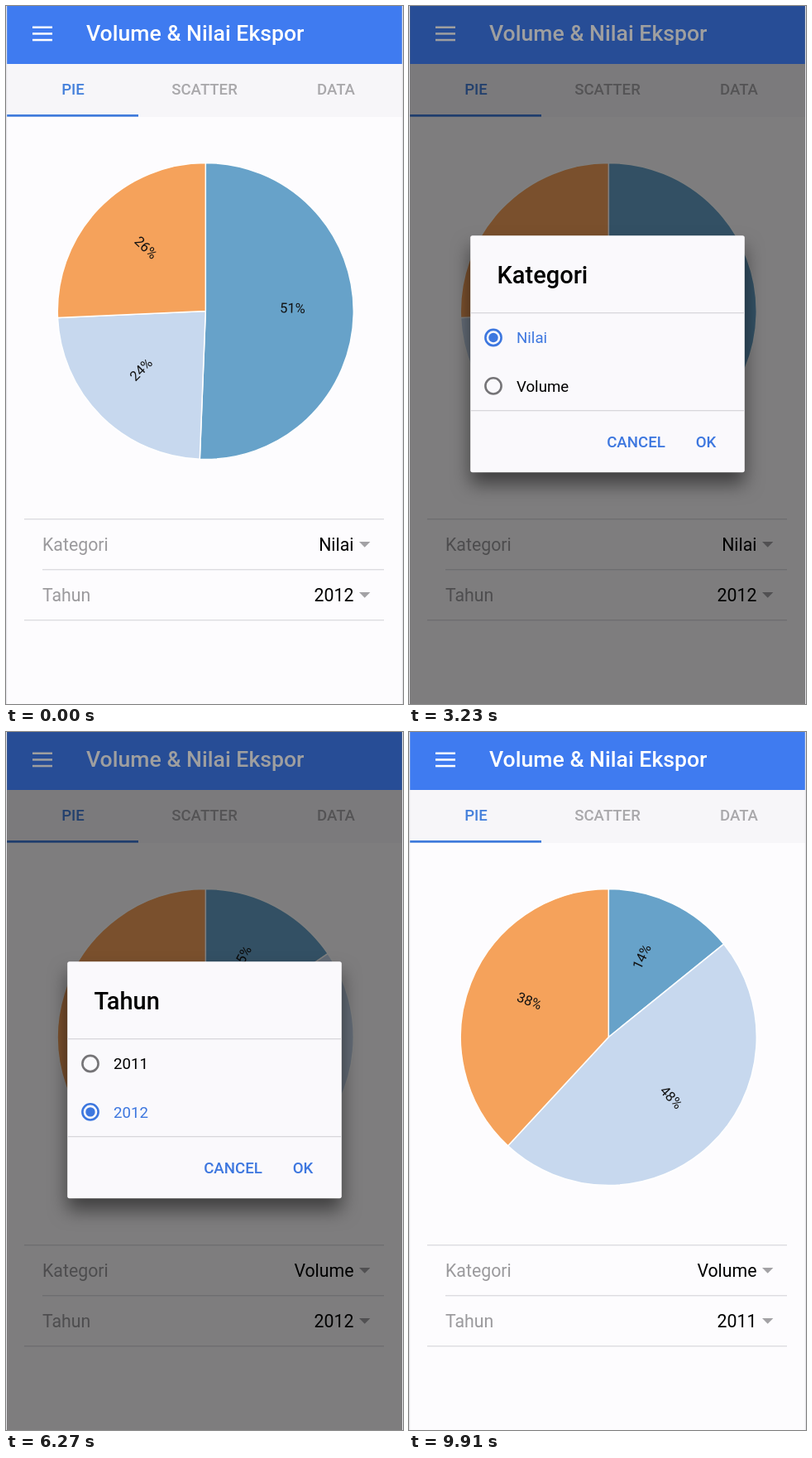
Write an HTML page that moves like this. It is 480x843 px and loops after 9960 ms.

```html
<!DOCTYPE html>
<html lang="id">
<head>
<meta charset="utf-8">
<title>Volume &amp; Nilai Ekspor</title>
<style>
html, body { margin: 0; width: 100%; height: 100%; overflow: hidden; background: #fdfcfe; }
svg { display: block; width: 100vw; height: 100vh; font-family: Roboto, sans-serif; }
.m { font-weight: 500; }
.card { filter: drop-shadow(0 14px 11px rgba(0, 0, 0, .5)); }
</style>
</head>
<body>
<svg id="stage" viewBox="0 0 480 843"></svg>
<script>
const LOOP = 9960;
const BLUE = '#3d77df';
const stage = document.getElementById('stage');

function el(parent, tag, attrs, text) {
  const node = document.createElementNS('http://www.w3.org/2000/svg', tag);
  set(node, attrs);
  if (text !== undefined) node.textContent = text;
  parent.appendChild(node);
  return node;
}
function set(node, attrs) {
  for (const k in attrs) node.setAttribute(k, attrs[k]);
}
const rect = (p, x, y, width, height, fill, more) => el(p, 'rect', { x, y, width, height, fill, ...more });
const label = (p, x, y, size, fill, text, more) => el(p, 'text', { x, y, 'font-size': size, fill, ...more }, text);
const clamp = v => Math.max(0, Math.min(1, v));
const smooth = v => { v = clamp(v); return v * v * (3 - 2 * v); };
const MID = { 'text-anchor': 'middle', class: 'm' };

// Slice ends in degrees, clockwise from the top
const charts = [
  { ends: [182.25, 267.4, 360], names: ['51%', '24%', '26%'], kind: 'Nilai', year: '2012' },
  { ends: [55.7, 214.1, 360], names: ['15%', '44%', '41%'], kind: 'Volume', year: '2012' },
  { ends: [51.1, 222.8, 360], names: ['14%', '48%', '38%'], kind: 'Volume', year: '2011' }
];

const dialogs = [
  { title: 'Kategori', options: ['Nilai', 'Volume'], start: 0, row: 619,
    tap: 2190, open: 2220, pick: 3400, press: 4240, spread: 4300, close: 4331 },
  { title: 'Tahun', options: ['2011', '2012'], start: 1, row: 681,
    tap: 5570, open: 5600, pick: 6750, press: 7250, spread: 7300, close: 7452 }
];

const defs = el(stage, 'defs', {});
rect(stage, 0, 0, 480, 843, '#fdfcfe');

// Header and tabs
rect(stage, 1, 0, 478, 70, '#3f7bf0');
for (const y of [24.5, 32.2, 39.8]) rect(stage, 32, y, 24, 2.5, '#fff');
label(stage, 97, 42, 26.6, '#fff', 'Volume & Nilai Ekspor', { class: 'm' });
rect(stage, 1, 70, 478, 64, '#f7f6f9');
['PIE', 'SCATTER', 'DATA'].forEach((name, i) =>
  label(stage, 81 + i * 159, 107.3, 18.6, i ? '#a9a8ab' : '#4580db', name, MID));
rect(stage, 1, 131, 159, 2.7, '#3f7bdc');

// Pie
const CX = 241.3, CY = 368.5, R = 179;
const polar = (deg, r) => {
  const a = deg * Math.PI / 180;
  return [CX + r * Math.sin(a), CY - r * Math.cos(a)];
};
const slices = ['#67a2c9', '#c7d8ee', '#f5a25b'].map(fill =>
  el(stage, 'path', { fill, stroke: '#fff', 'stroke-width': 1.5, 'stroke-linejoin': 'round' }));
const marks = slices.map(() => label(stage, 0, 0, 16.6, '#111', '', { 'text-anchor': 'middle' }));

// Form rows
rect(stage, 22, 619, 435, 1.4, '#dddce0');
rect(stage, 44, 680, 413, 1.4, '#dddce0');
rect(stage, 22, 741, 435, 1.4, '#dddce0');
const values = ['Kategori', 'Tahun'].map((name, i) => {
  const y = 657.6 + i * 61;
  label(stage, 44, y, 21.3, '#9b9a9d', name);
  el(stage, 'path', { d: `M427 ${y - 10.6}h13.4l-6.7 6.8z`, fill: '#a3a2a5' });
  return label(stage, 420.5, y, 21.3, '#000', '', { 'text-anchor': 'end' });
});

function clip(id, x, y, w, h) {
  rect(el(defs, 'clipPath', { id }), x, y, w, h, '#000', { rx: id[0] === 'b' ? 2.6 : 0 });
  return { 'clip-path': `url(#${id})` };
}
dialogs.forEach((d, i) => {
  const g = el(stage, 'g', clip('row' + i, 22, d.row, 435, 62));
  d.ripple = el(g, 'circle', { cx: 439, cy: d.row + 31, r: 0 });
});

// Screen edges and backdrop
rect(stage, 0, 0, 1.2, 843, '#e4e3e7');
rect(stage, 478.8, 0, 1.2, 843, '#e4e3e7');
const topDim = rect(stage, 1, 0, 478, 70, '#000');
const dim = rect(stage, 1, 70, 478, 773, '#000');

dialogs.forEach((d, i) => {
  const g = d.g = el(stage, 'g', {});
  rect(g, 74.2, 277.2, 331.6, 286, '#faf9fc', { rx: 2.6, class: 'card' });
  label(g, 106.5, 335.3, 29, '#000', d.title, { class: 'm' });
  for (const y of [370, 488]) rect(g, 74.2, y, 331.6, 1.3, '#d8d7db');
  d.radios = d.options.map((name, k) => {
    const cy = 400.5 + k * 58.4;
    return {
      ring: el(g, 'circle', { cx: 102, cy, r: 9.6, fill: 'none', 'stroke-width': 2.6 }),
      dot: el(g, 'circle', { cx: 102, cy, fill: BLUE }),
      name: label(g, 130, cy + 6.7, 18.67, '#000', name)
    };
  });
  const button = el(g, 'g', clip('button' + i, 334.4, 499.7, 50.6, 53.3));
  d.active = rect(button, 334, 499, 52, 55, '#000');
  d.spot = el(button, 'circle', { cx: 347, cy: 525, r: 0, 'fill-opacity': .11 });
  label(g, 274.5, 532.8, 18.67, BLUE, 'CANCEL', MID);
  label(g, 359, 532.8, 18.67, BLUE, 'OK', MID);
});

function drawChart(c) {
  let from = 0;
  c.ends.forEach((to, i) => {
    const a = polar(from, R), b = polar(to, R), mid = (from + to) / 2;
    set(slices[i], { d: `M${CX} ${CY}L${a}A${R} ${R} 0 ${+(to - from > 180)} 1 ${b}Z` });
    const [x, y] = polar(mid, 105);
    set(marks[i], { transform: `translate(${x} ${y}) rotate(${mid - (mid < 180 ? 90 : 270)})` });
    marks[i].textContent = c.names[i];
    from = to;
  });
  values[0].textContent = c.kind;
  values[1].textContent = c.year;
}

function drawDialog(d, t) {
  const enter = smooth((t - d.open) / 200);
  const leave = smooth((t - d.close) / 200);
  const show = enter * (1 - leave);
  const scale = 1.1 - .1 * enter - .1 * leave;
  set(d.g, {
    opacity: show,
    display: show > 0 ? 'inline' : 'none',
    transform: `translate(240 420.2) scale(${scale}) translate(-240 -420.2)`
  });

  const age = t - d.tap;
  set(d.ripple, { r: Math.max(0, age * .71), opacity: .15 * (1 - smooth((age - 220) / 350)) });

  const swap = smooth((t - d.pick) / 200);
  const chosen = t < d.pick ? d.start : 1 - d.start;
  d.radios.forEach((r, k) => {
    set(r.ring, { stroke: k === chosen ? BLUE : '#757477' });
    set(r.dot, { r: 5.7 * (k === d.start ? 1 - swap : swap) });
    set(r.name, { fill: k === chosen ? BLUE : '#000' });
  });

  set(d.active, { 'fill-opacity': .07 * clamp((t - d.press) / 60) });
  set(d.spot, { r: Math.max(0, (t - d.spread) * .3) });
  return show;
}

function draw(t) {
  drawChart(charts[dialogs.filter(d => t >= d.close).length]);
  const shade = Math.max(...dialogs.map(d => drawDialog(d, t))) * .5;
  set(dim, { opacity: shade });
  set(topDim, { opacity: shade * .75 });
}

function tick() {
  draw(performance.now() % LOOP);
  requestAnimationFrame(tick);
}
draw(0);
requestAnimationFrame(tick);
</script>
</body>
</html>
```
